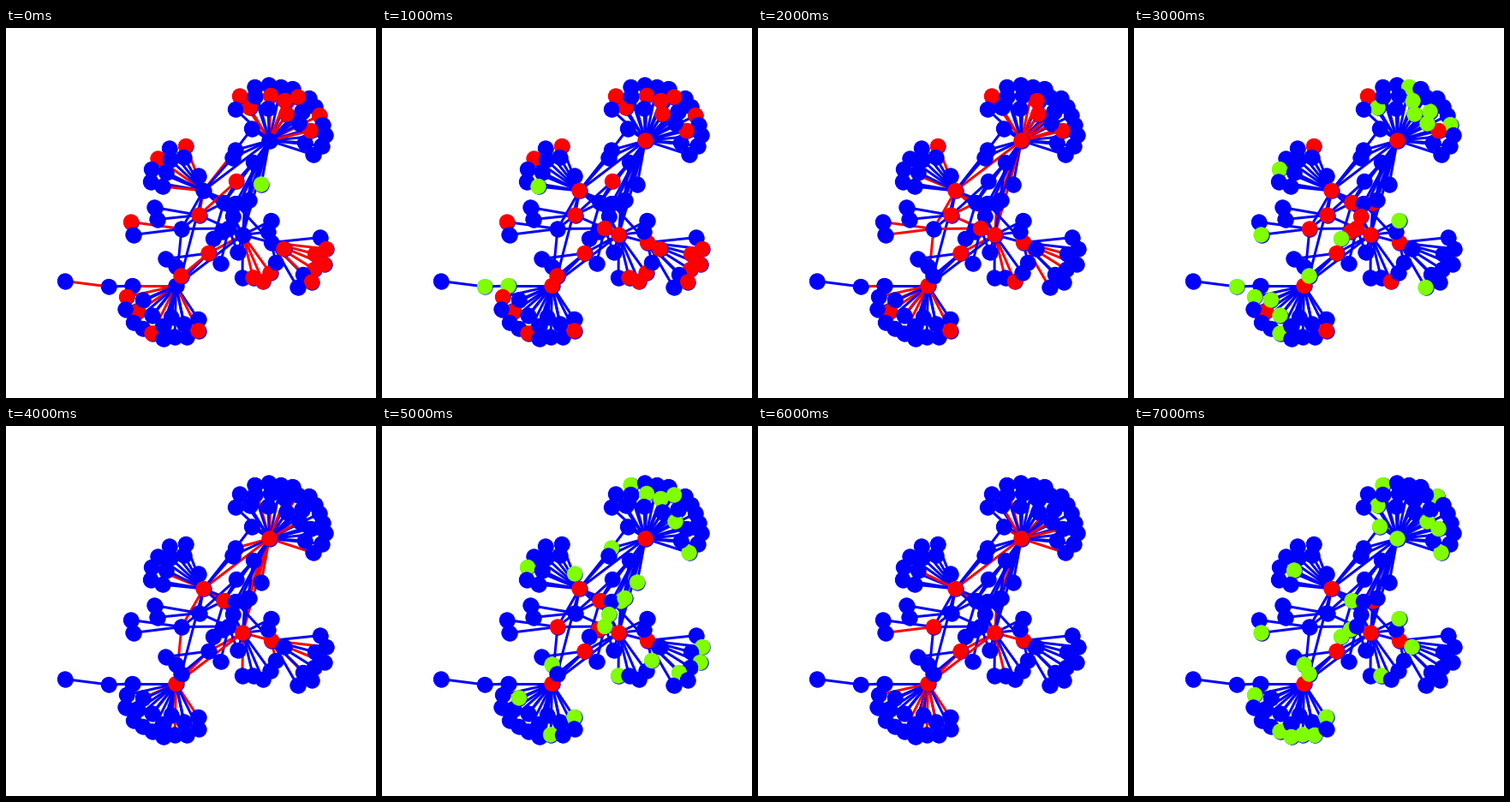
A matplotlib script that plays this animation: 432x432 px, repeating every 8000 ms.

```python
import matplotlib.pyplot as plt
from matplotlib.animation import FuncAnimation
from matplotlib.collections import LineCollection

BLUE, RED, GREEN = "#0000ff", "#ff0000", "#80ff00"

# Each group starts with its hub; M holds the loosely linked middle.
GROUPS = {
    "T": [(307.5, 131.5), (273, 79.5), (290.5, 69), (307, 66.5), (321, 69),
          (334.5, 71), (354, 82), (361, 92), (366, 102), (369.5, 113),
          (373, 125), (368.5, 137.5), (358.5, 148), (349, 134), (355.5, 120),
          (342.5, 111.5), (345.5, 97.5), (341, 80.5), (325.5, 85),
          (327.5, 100.5), (309, 79), (306, 94), (284.5, 93), (290.5, 80),
          (268, 95), (287, 117.5), (268, 142.5), (264.5, 151.5), (289, 157),
          (298, 182.5)],
    "L": [(230.5, 190), (210, 138), (191, 140.5), (207.5, 151),
          (177.5, 152.5), (192, 154), (170, 165), (187, 168.5),
          (169, 179.5), (182.5, 185), (225, 172.5)],
    "B": [(198.5, 301), (147.5, 301), (154, 331), (141, 314), (160, 317.5),
          (139.5, 328.5), (149, 344), (159.5, 351), (170.5, 335.5),
          (170.5, 356.5), (183.5, 348), (183.5, 363), (193, 337.5),
          (197, 360.5), (208, 345.5), (211, 361), (224.5, 340),
          (224.5, 353.5), (120, 302), (69, 295.5)],
    "M": [(205, 234.5), (146, 226.5), (148.5, 241.5), (173.5, 209.5),
          (176.5, 223.5), (225.5, 218.5), (254.5, 204), (279, 204.5),
          (268, 205), (283.5, 201), (265, 220), (253, 237.5), (260, 234),
          (242, 246), (236.5, 263), (250.5, 275), (270.5, 262), (269, 179),
          (186.5, 269.5), (198.5, 278.5), (204.5, 289.5)],
    "D": [(276.5, 241.5), (276, 291.5), (288.5, 291.5), (300, 296),
          (308.5, 286)],
    "R": [(310, 250.5), (324.5, 258), (367, 244.5), (374, 258), (361, 264),
          (371.5, 276), (360, 282), (347, 288), (357, 296.5), (340.5, 303),
          (315, 274), (306, 238), (309.5, 225)],
}

LINKS = """B1-B18 B18-B19 T25-T26 T0-L0 T0-D0 T0-M7 T0-M8 T0-M9 T0-M10
T28-M6 T28-D0 T28-M17 L0-T26 L0-T27 L0-M0 L0-M5 L0-M6 L0-M8 L0-M10 L0-M20
M5-M17 M6-M17 M5-M3 M5-M4 M5-M0 M5-M6 M5-M12 M0-M1 M0-M2 M0-M12 M0-B0
M14-M18 M14-B0 M14-D0 M14-M12 M14-M20 M12-M15 M12-M16 M12-M13 M12-D0
M6-M13 M6-M10 M6-D0 M7-D0 M9-D0 M10-D0 M11-D0 M16-D0 D0-B0 D0-R0 D0-R11
D0-R12 R0-M8 M19-M18 M19-B0 M20-B0""".split()

# Even steps send along red links, odd steps show who received.
STEPS = [
    dict(red="T 1 8 14 17 18 19 20 22 L 1 4 M 1 5 14 17 20 D 2 3 4 "
             "R 1 3 4 5 6 8 B 2 3 9 17",
         green="T 29",
         sent="T 1 8 14 17 18 19 20 22 L 1 4 9 D 2 3 4 R 1 3 4 5 6 8 "
              "B 1 2 3 9 17",
         links="B18-B19 M0-M1 M5-M17 M14-M20 M14-D0 L0-T26 L0-M5"),
    dict(red="T 0 1 8 14 17 18 19 20 22 L 0 1 4 M 1 5 12 14 17 20 "
             "D 0 2 3 4 R 0 1 3 4 5 6 8 B 0 2 3 9 17",
         green="L 9 B 1 18"),
    dict(red="T 0 1 14 18 19 L 0 1 M 5 12 14 D 0 3 R 0 B 0 2 17",
         sent="T 1 4 9 14 15 16 18 19 22 L 1 6 D 2 3 R 4 5 6 9 12 "
              "B 2 3 4 8 9 17",
         links="B1-B18 M0-M1 M0-M2 L0-M0 T0-L0 T0-D0 L0-M6 L0-M10 M0-M12 "
               "M5-M6 M5-M12 M12-M13 M14-D0 M14-M12 M0-B0 T0-M7 M7-D0"),
    dict(red="T 0 1 14 L 0 1 M 0 5 6 7 10 11 12 14 D 0 3 R 0 B 0 2 17",
         green="T 4 9 15 16 18 19 22 L 6 M 2 13 20 R 9 12 B 3 4 8 9 18"),
    dict(red="T 0 L 0 M 6 D 0 R 0 B 0",
         sent="T 2 12 15 17 18 20 26 29 L 6 10 D 1 R 3 5 7 10 B 4 13 16",
         links="T0-L0 T0-M7 T0-M9 L0-M0 L0-M6 M0-B0 M14-B0 M14-D0 D0-B0 "
               "M6-M10 M11-D0 M12-D0 M19-B0 T0-D0 D0-R0"),
    dict(red="T 0 L 0 M 0 6 11 14 D 0 R 0 B 0",
         green="T 2 12 15 17 18 20 26 29 L 6 10 M 7 9 10 12 19 D 1 "
               "R 3 5 7 10 B 4 13 16"),
    dict(red="T 0 L 0 M 0 14 D 0 R 0 B 0",
         sent="T 2 6 12 14 15 22 25 L 7 D 2 R 1 12 B 3 9 11 13 15 16",
         links="T0-L0 T0-M7 M7-D0 L0-M6 M0-M2 M11-D0 M14-B0 M14-D0 D0-R0 "
               "M19-B0 M20-B0 D0-B0"),
    dict(red="L 0 M 7 14 D 0 R 0 B 0",
         green="T 0 2 6 12 14 15 22 25 L 7 M 2 6 11 13 19 20 D 2 "
               "R 1 12 B 3 9 11 13 15 16"),
]


def names(text):
    """Expand 'T 1 2 L 0' to T1, T2, L0."""
    out, group = [], ""
    for token in text.split():
        if token.isalpha():
            group = token
        else:
            out.append(group + token)
    return out


pos = {f"{g}{i}": p for g, pts in GROUPS.items() for i, p in enumerate(pts)}
edges = [f"{g}0-{g}{i}" for g in "TLDRB" for i in range(1, len(GROUPS[g]))
         if f"{g}{i}" not in ("B18", "B19")] + LINKS

fig = plt.figure(figsize=(6, 6), dpi=72, facecolor="white")
ax = fig.add_axes([0, 0, 1, 1])
ax.set_xlim(0, 432)
ax.set_ylim(432, 0)
ax.axis("off")

lines = LineCollection([[pos[n] for n in e.split("-")] for e in edges],
                       linewidths=3, zorder=1)
ax.add_collection(lines)
xs, ys = zip(*pos.values())
ax.scatter(xs, ys, s=300, c=BLUE, linewidths=1, zorder=2)
dots = ax.scatter(xs, ys, s=300, linewidths=1, zorder=3)


def update(k):
    step = STEPS[k]
    red, green = names(step["red"]), names(step.get("green", ""))
    colors = [RED if n in red else GREEN if n in green else BLUE for n in pos]
    dots.set_facecolor(colors)
    dots.set_edgecolor(colors)
    hot = {f"{n[0]}0-{n}" for n in names(step.get("sent", ""))}
    hot.update(step.get("links", "").split())
    lines.set_color([RED if e in hot else BLUE for e in edges])
    return lines, dots


anim = FuncAnimation(fig, update, frames=len(STEPS), interval=1000,
                     repeat=True, repeat_delay=0)
plt.show()
```
